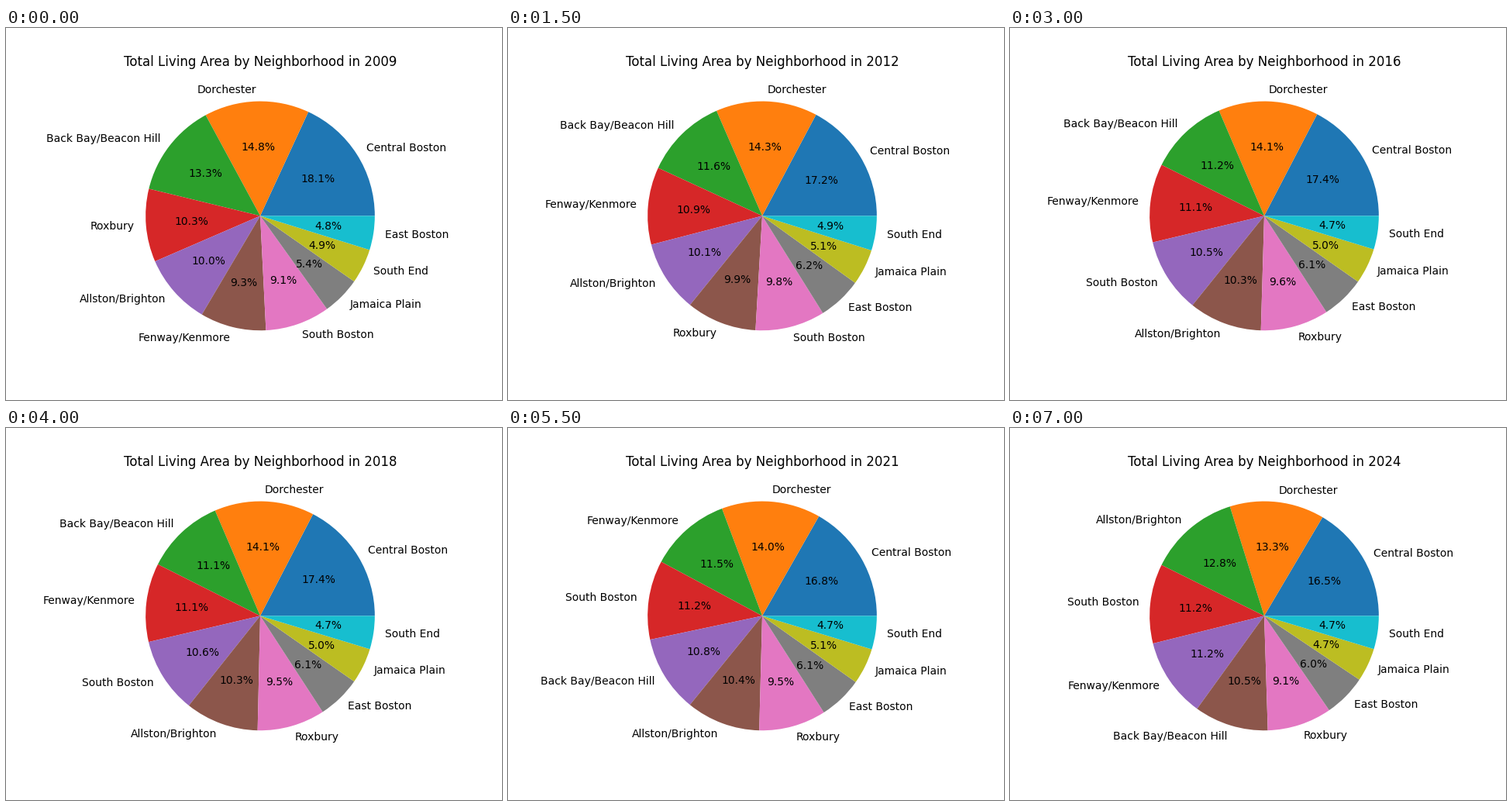
Write a matplotlib script that moves like this. It is 640 by 480 pixels and loops after 7500 ms.

```python
import numpy as np
import matplotlib.pyplot as plt
from matplotlib.animation import FuncAnimation

# Percent share of each area at the turning points of its trend.
TRENDS = {
    "Central Boston": (18.1, 17.22, 17.38, 16.69, 16.84, 16.5),
    "Dorchester": (14.8, 14.31, 14.07, 14.11, 13.78, 13.34),
    "Back Bay/Beacon Hill": (13.3, 11.6, 11.13, 10.99, 10.62, 10.46),
    "Roxbury": (10.3, 9.91, 9.54, 9.6, 9.3, 9.1),
    "Allston/Brighton": (10.0, 10.12, 10.34, 10.4, 10.5, 12.84),
    "Fenway/Kenmore": (9.3, 10.91, 11.08, 11.46, 11.46, 11.16),
    "South Boston": (9.1, 9.81, 10.64, 10.82, 11.52, 11.2),
    "Jamaica Plain": (5.4, 5.07, 5.01, 5.17, 5.0, 4.72),
    "South End": (4.9, 4.87, 4.69, 4.66, 4.78, 4.68),
    "East Boston": (4.8, 6.18, 6.12, 6.1, 6.2, 6.0),
}

# How far along the turning points each year lies; years between are linear.
PACE = {2009: 0, 2011: 0.05, 2012: 1, 2013: 1.05, 2016: 1.85, 2018: 2,
        2019: 2.15, 2020: 3, 2022: 3.95, 2023: 4, 2024: 5}

YEARS = [year for year in range(2009, 2025) if year != 2014]

fig, ax = plt.subplots(figsize=(6.4, 4.8), dpi=100)


def shares_in(year):
    """Areas and their shares, largest first."""
    pos = np.interp(year, list(PACE), list(PACE.values()))
    shares = {area: np.interp(pos, range(len(trend)), trend)
              for area, trend in TRENDS.items()}
    return sorted(shares.items(), key=lambda item: -item[1])


def draw(year):
    areas, shares = zip(*shares_in(year))
    ax.clear()
    ax.pie(shares, labels=areas, autopct="%1.1f%%")
    ax.set_title(f"Total Living Area by Neighborhood in {year}")


anim = FuncAnimation(fig, draw, frames=YEARS, interval=500,
                     repeat=True, repeat_delay=0)
plt.show()
```
